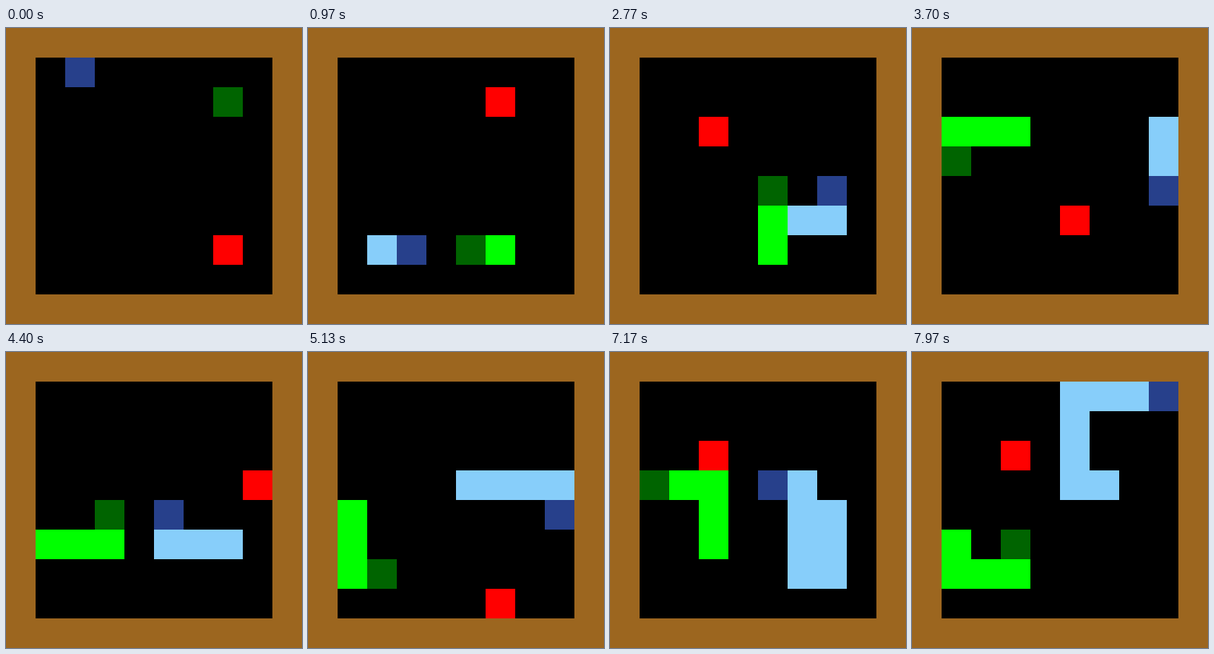
An HTML page with a canvas that plays this animation: 400 by 400 pixels, repeating every 8000 ms.

```html
<!DOCTYPE html>
<html lang="en">
<head>
<meta charset="utf-8">
<title>Two snakes</title>
<style>
  html, body { margin: 0; width: 100%; height: 100%; overflow: hidden; background: #9c661f; }
  canvas { display: block; width: 400px; height: 400px; }
</style>
</head>
<body>
<canvas id="stage" width="400" height="400"></canvas>
<script>
const ctx = document.getElementById('stage').getContext('2d');
const CELL = 40;
const LOOP_MS = 8000;
const STEP_MS = 400 / 3;
const LEAD_MS = 37; // part of the first step already elapsed

const DIRECTIONS = { U: [0, -1], D: [0, 1], L: [-1, 0], R: [1, 0] };

// Expands a route such as "D6R1" into the list of head positions.
function walk([x, y], route) {
  const cells = [[x, y]];
  for (const [, dir, count] of route.matchAll(/([UDLR])(\d)/g)) {
    const [dx, dy] = DIRECTIONS[dir];
    for (let i = 0; i < count; i++) cells.push([x += dx, y += dy]);
  }
  return cells;
}

const snakes = [
  {
    head: '#006400', body: '#00ff00',
    path: walk([6, 1], 'D5L5D1L1U1R3D1R1U5L4D3R2U1L2D2R3U2L1U1L2D2R2U2L2D3R2U1')
  },
  {
    head: '#27408b', body: '#87cefa',
    path: walk([1, 0], 'D6R1U5R3D4R1U4R1D4L3U2R3D4L3U2R1D1R1U2L1U1L1U3R3')
  }
];

const foods = [[6, 6], [2, 6], [5, 1], [4, 7], [2, 2], [4, 5],
               [7, 3], [5, 7], [0, 3], [6, 6], [4, 3], [2, 2]];

function stateAt(step) {
  const lengths = snakes.map(() => 1);
  let eaten = 0;
  for (let s = 1; s <= step; s++) {
    const [fx, fy] = foods[eaten];
    const eater = snakes.findIndex(({ path }) => path[s][0] === fx && path[s][1] === fy);
    if (eater >= 0) {
      lengths[eater]++;
      eaten++;
    }
  }
  return { lengths, food: foods[eaten] };
}

function fillCell([x, y], color) {
  ctx.fillStyle = color;
  ctx.fillRect((x + 1) * CELL, (y + 1) * CELL, CELL, CELL);
}

function draw(step) {
  const { lengths, food } = stateAt(step);
  ctx.fillStyle = '#9c661f';
  ctx.fillRect(0, 0, 400, 400);
  ctx.fillStyle = '#000';
  ctx.fillRect(CELL, CELL, 8 * CELL, 8 * CELL);
  fillCell(food, '#ff0000');
  snakes.forEach(({ path, head, body }, i) => {
    for (let s = step - lengths[i] + 1; s < step; s++) fillCell(path[s], body);
    fillCell(path[step], head);
  });
}

const start = performance.now();
function frame() {
  const time = (performance.now() - start) % LOOP_MS;
  draw(Math.floor((time + LEAD_MS) / STEP_MS));
  requestAnimationFrame(frame);
}
frame();
</script>
</body>
</html>
```
